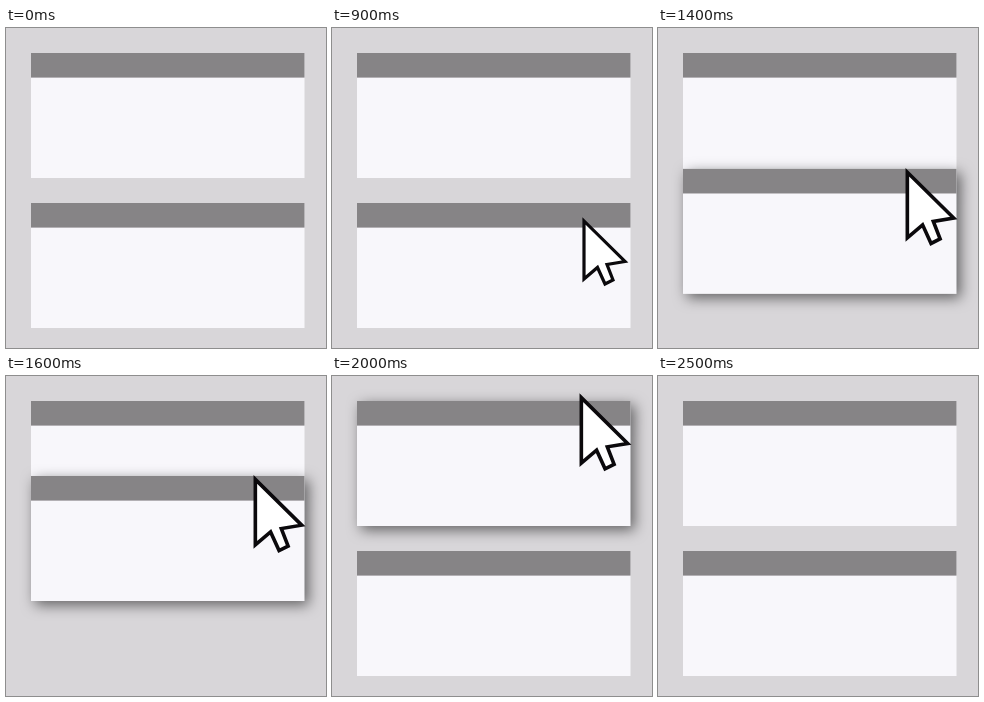
An HTML page for the animation above (2700 ms loop, 320 by 320 pixels).

```html
<!DOCTYPE html>
<html lang="en">
<head>
<meta charset="utf-8">
<title>Drag to reorder</title>
<style>
  html, body { margin: 0; height: 100%; overflow: hidden; background: #d8d6d9; }
  svg { display: block; width: 100%; height: 100%; }
  .head { fill: #868486; }
  .body { fill: #f8f7fb; }
  #cursor { fill: #fff; stroke: #0b090c; stroke-width: 3.2; stroke-miterlimit: 8; }
</style>
</head>
<body>
<svg viewBox="0 0 320 320">
  <defs>
    <g id="card">
      <rect class="body" width="273.5" height="125"/>
      <rect class="head" width="273.5" height="24.6"/>
    </g>
  </defs>
  <use id="still" href="#card"/>
  <use id="drag" href="#card"/>
  <path id="cursor" d="M-20.5-31.5V26.5L-7 15L.5 31.5L8.5 27.5L2.5 12L20.5 9Z"/>
</svg>
<script>
const LOOP = 2700, STEP = 100;
const TOP = 25, GAP = 150;
const GRAB = 1233, DROP = 1967;
const [still, drag, cursor] = ["still", "drag", "cursor"].map(id => document.getElementById(id));

// Linear progress from a to b, clamped to 0..1
const ramp = (t, a, b) => Math.min(1, Math.max(0, (t - a) / (b - a)));

const place = (el, x, y, scale = 1) =>
  el.setAttribute("transform", `translate(${x} ${y}) scale(${scale})`);

function draw(t) {
  const lift = ramp(t, 1000, 1200) - ramp(t, 2000, 2200);
  place(drag, 25, TOP + GAP * (1 - ramp(t, GRAB, DROP)));
  place(still, 25, TOP + GAP * ramp(t, 1733, DROP));
  drag.style.filter = lift > 0
    ? `drop-shadow(4px 4px 7px rgba(0,0,0,${0.55 * lift}))`
    : "none";

  const enter = 361 - 147 * ramp(t, 0, 969);
  const leave = Math.max(0, t - GRAB) * GAP / (DROP - GRAB);
  place(cursor, 272.5, enter - leave, 1 + 0.13 * lift);
}

const start = performance.now();
function tick() {
  const t = (performance.now() - start) % LOOP;
  draw(Math.min(2500, Math.floor(t / STEP) * STEP));
  requestAnimationFrame(tick);
}
tick();
</script>
</body>
</html>
```
